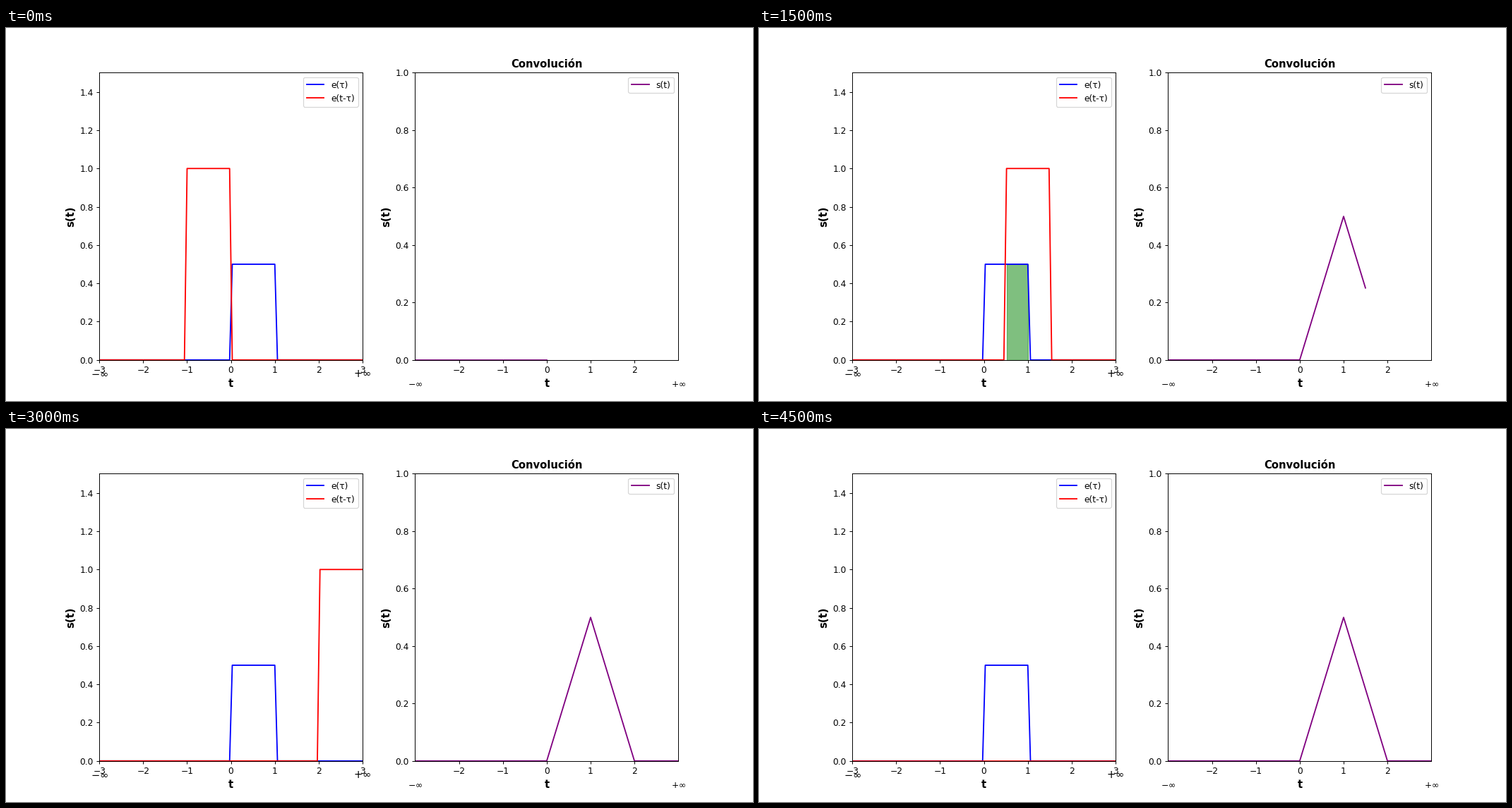
These frames come from a looping animation (1058x529 px, 10000 ms). A matplotlib script:

```python
import numpy as np
import matplotlib.pyplot as plt
from matplotlib.animation import FuncAnimation

plt.rcParams["font.family"] = "DejaVu Sans"

STEP_MS = 500
LOOP_MS = 10000
EPS = 1e-9

tau = np.linspace(-3, 3, 100)
time = np.linspace(-3, 3, 1000)


def pulse(x):
    """Unit pulse on [0, 1], both ends included."""
    return np.where((x >= -EPS) & (x <= 1 + EPS), 1.0, 0.0)


def label_axes(ax, top, inf_size):
    ax.set_xlim(-3, 3)
    ax.set_ylim(0, top)
    ax.set_xlabel("t", fontsize=12, fontweight="bold")
    ax.set_ylabel("s(t)", fontsize=12, fontweight="bold")
    for x, text in ((-3, r"$-\infty$"), (3, r"$+\infty$")):
        ax.text(x, -0.1, text, ha="center", va="bottom", fontsize=inf_size)


# 12 x 6 inches, 1058 x 529 pixels
fig, (left, right) = plt.subplots(1, 2, figsize=(12, 6), dpi=529 / 6)

fixed = 0.5 * pulse(tau)
response = 0.5 * np.clip(1 - np.abs(time - 1), 0, None)

left.plot(tau, fixed, color="blue", label="e(τ)")
moving_line, = left.plot([], [], color="red", label="e(t-τ)")
label_axes(left, 1.5, 12)
left.legend(loc="upper right")

result_line, = right.plot([], [], color="purple", label="s(t)")
label_axes(right, 1, 10)
right.set_xticks(range(-2, 3))
right.set_title("Convolución", fontweight="bold")
right.legend(loc="upper right")

overlap_fills = []


def update(frame):
    t = frame * STEP_MS / 1000
    moving = pulse(t - tau)
    moving_line.set_data(tau, moving)

    while overlap_fills:
        overlap_fills.pop().remove()
    product = fixed * moving
    overlap_fills.append(left.fill_between(
        tau, product, where=product > 0, color="green", alpha=0.5))

    past = time < t - EPS
    result_line.set_data(time[past], response[past])
    return moving_line, result_line, *overlap_fills


anim = FuncAnimation(fig, update, frames=LOOP_MS // STEP_MS,
                     init_func=lambda: update(0), interval=STEP_MS,
                     repeat=True, repeat_delay=0, blit=False)

plt.show()
```
